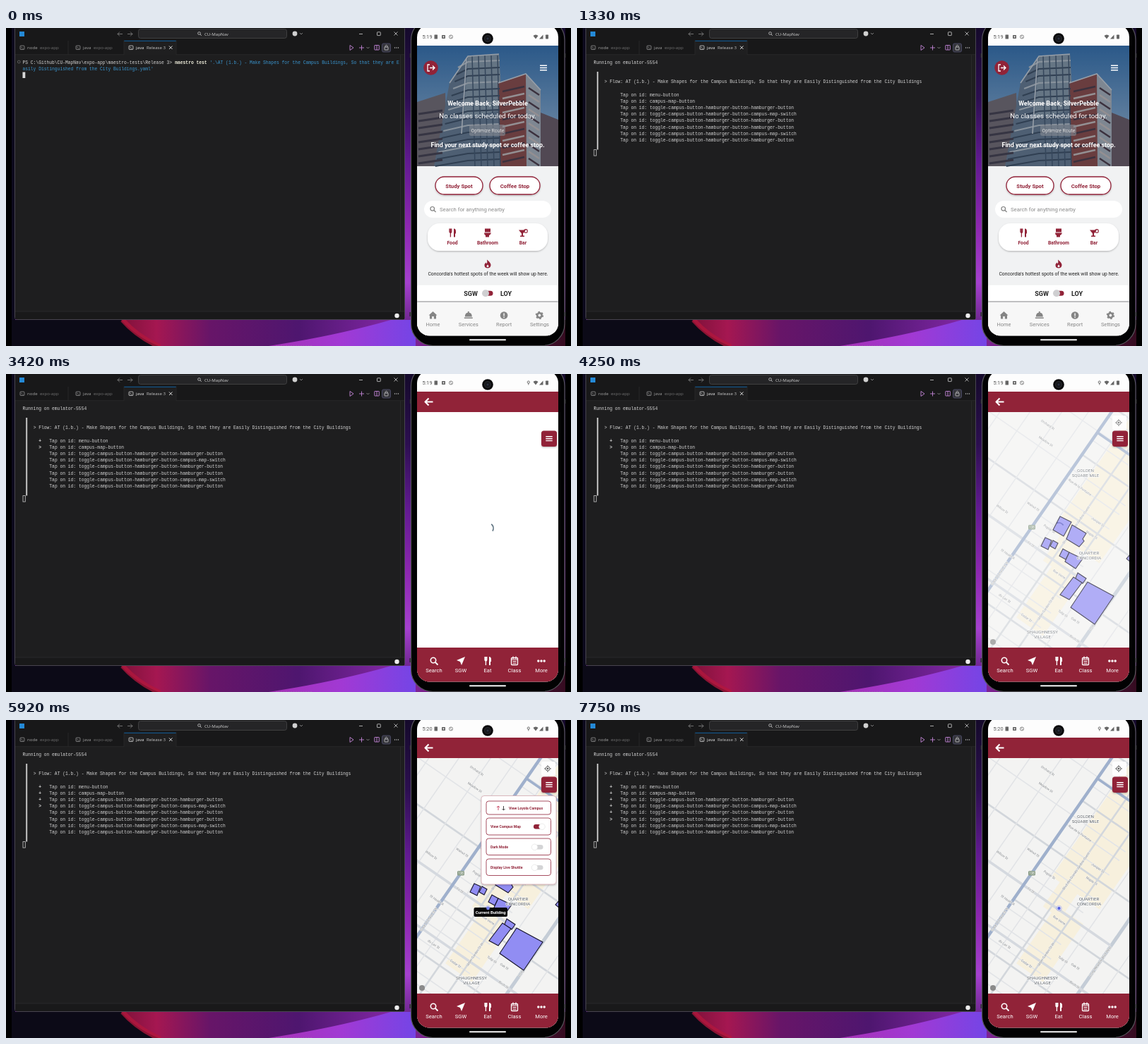
Animation, 800 px wide and 451 px high, one loop 8000 ms. Source, as an HTML page:

```html
<!DOCTYPE html>
<html lang="en">
<head>
<meta charset="utf-8">
<title>Campus map test run</title>
<style>
html, body { margin: 0; width: 100%; height: 100%; overflow: hidden; background: #000; }
svg { display: block; width: 800px; height: 451px; }
text { font-family: Roboto, "Noto Sans", sans-serif; white-space: pre; }
.mono { font-family: "Liberation Mono", "DejaVu Sans Mono", monospace; font-size: 6.3px; }
.ui { font-family: "Open Sans", "Noto Sans", sans-serif; font-size: 6.1px; }
.b { font-weight: 700; }
.m { text-anchor: middle; }
</style>
</head>
<body>
<svg id="stage" viewBox="0 0 800 451" xmlns="http://www.w3.org/2000/svg"></svg>
<script>
const LOOP = 8000;
const RED = '#912338';

const rect = (x, y, w, h, fill, rx = 0, more = '') =>
  `<rect x="${x}" y="${y}" width="${w}" height="${h}" rx="${rx}" fill="${fill}" ${more}/>`;
const dot = (x, y, r, fill, more = '') => `<circle cx="${x}" cy="${y}" r="${r}" fill="${fill}" ${more}/>`;
const shape = (d, fill, more = '') => `<path d="${d}" fill="${fill}" ${more}/>`;
const line = (d, color, w = 1, more = '') =>
  `<path d="${d}" fill="none" stroke="${color}" stroke-width="${w}" ${more}/>`;
const text = (x, y, s, size, fill, cls = '', more = '') =>
  `<text x="${x}" y="${y}" font-size="${size}" fill="${fill}" class="${cls}" ${more}>${s}</text>`;
const group = (id, body, more = '') => `<g id="${id}" ${more}>${body}</g>`;
const at = (x, y, body, s = 1) => `<g transform="translate(${x} ${y}) scale(${s})">${body}</g>`;

// Small icons, centred on 0,0
const burger = (c, w = 5, gap = 3.2) =>
  [-gap, 0, gap].map(y => line(`M${-w} ${y}H${w}`, c, 1.4)).join('');
const backArrow = c => line('M6 0H-5M0-5L-5 0L0 5', c, 2.1, 'stroke-linejoin="round"');
const fork = c => line('M-4-6V-2Q-4 0-2.6 0Q-1.2 0-1.2-2V-6M-2.6-6V6', c, 1.3) +
  shape('M2-6Q5-6 5-2V1H4V6H2Z', c);
const lens = c => `<circle cx="-1" cy="-1" r="3.7" fill="none" stroke="${c}" stroke-width="1.6"/>` +
  line('M2 2L5.5 5.5', c, 1.8);
const plane = c => shape('M6-6L1 6L-1 1L-6-1Z', c);
const calendar = c => `<rect x="-4.5" y="-4.5" width="9" height="10" rx="1" fill="none" stroke="${c}" stroke-width="1.3"/>` +
  line('M-4.5-2H4.5M-2-6.5V-3M2-6.5V-3M-2.5 .5H2.5M-2.5 3H2.5', c, 1.2);
const dots = (c, r, gap) => [-gap, 0, gap].map(x => dot(x, 0, r, c)).join('');
const house = c => shape('M-6 0L0-5.5L6 0H4.5V5H1.3V1.5H-1.3V5H-4.5V0Z', c);
const bell = c => shape('M-5 2Q-5-4 0-4Q5-4 5 2ZM-6 3H6V4.5H-6ZM-1-5.5H1V-4H-1Z', c);
const info = c => dot(0, 0, 5.3, c) + line('M0-3V1M0 2V3.4', '#f6f6f6', 1.5);
const gear = c => `<circle r="3.2" fill="none" stroke="${c}" stroke-width="2.6"/>` +
  `<circle r="4.9" fill="none" stroke="${c}" stroke-width="1.6" stroke-dasharray="2.5 2.63"/>`;
const toilet = c => shape('M-4-6H4V-1H-4ZM-5 0H5Q4 3 2 3.5V6H-3V3.5Q-5 3-5 0Z', c);
const glass = c => shape('M-6-4H4L0 1V4H2V5.5H-4V4H-2V1Z', c) +
  `<circle cx="4" cy="-2.6" r="2.3" fill="none" stroke="${c}" stroke-width="1.1"/>`;
const flame = c => shape('M-1-6Q5-1 4.5 2Q4 6 0 6Q-4.5 6-4.5 2Q-4.5 0-2.5-2L-1.5 0Q0-2-1-6Z', c) +
  shape('M0 1Q2 3 1.5 4Q0 5.5-1.5 4Q-2 3 0 1Z', '#f2f2f3');
const chevron = c => line('M-2-1L0 1L2-1', c, .8);
const shell = c => rect(-3, -2.7, 6, 5.4, 'none', 1, `stroke="${c}" stroke-width=".7"`) +
  line('M-1.7-1L-.5 0L-1.7 1M.2 1.1H1.8', c, .6);

function wallpaper() {
  return rect(8, 0, 784, 451, 'url(#side)') + rect(8, 0, 5, 451, '#0d0a1d') +
    rect(8, 414, 784, 37, '#0c0a17') +
    shape('M163 414Q184 438 216 451H792V414Z', 'url(#glow)') +
    line('M165 414Q186 438 218 452', '#b5173c', 7, 'opacity=".75"') +
    shape('M372 451Q470 436 545 414H580V451Z', 'url(#streak)') +
    line('M382 450.5H434', '#999', .8, 'stroke-dasharray="2 1.5" opacity=".4"');
}

function editor() {
  const grey = '#9a9a9a', pale = '#d0d0d0', tint = '#c586d8';
  let s = rect(12.5, -1, 552, 414.5, '#1e1e1f', 3, 'stroke="#48454f"');
  s += rect(13, 0, 551, 38, '#181819');
  s += rect(19, 5, 7, 7, '#2489d6');
  s += line('M165 8.500H158M161 5.500L158 8.500L161 11.500M172 8.500H179M176 5.500L179 8.500L176 11.500', '#888', .8);
  s += rect(187.5, 1.500, 210, 13, '#252527', 3, 'stroke="#48484a" stroke-width=".8"');
  s += at(274, 8, lens(pale), .5) + text(281, 10.500, 'CU-MapNav', 6.2, pale, 'ui');
  s += dot(409, 8, 3.4, pale) + at(418, 8, chevron(grey));
  s += line('M500 8.500H505M549.500 5.500L554.500 10.500M554.500 5.500L549.500 10.500', pale, .8) +
    rect(525.5, 5.8, 4.800, 4.800, 'none', .6, `stroke="${pale}" stroke-width=".8"`);
  s += rect(167, 18, 74, 20, '#1f1f20') + line('M167 18.300H241', '#0d72c0', .8) +
    line('M13 37.700H167M241 37.700H564M88 18V38M167 18V38M241 18V38', '#2b2b2d', .8);
  [[23, 'node', 48, 'expo-app'], [102, 'java', 124, 'expo-app'], [177, 'java', 199, 'Release 3']].forEach(([x, a, x2, b], i) => {
    const c = i === 2 ? '#f0f0f0' : '#a5a5a5';
    s += at(x, 27.800, shell(c)) + text(x + 7, 30, a, 6.1, c, 'ui') + text(x2, 30, b, 6.1, i === 2 ? '#c6c6c6' : '#727272', 'ui');
  });
  s += line('M231 25.500L235.500 30M235.500 25.500L231 30', '#eee', .9);
  s += line('M487 24.500L492 28L487 31.500Z', tint, .9) + line('M500 28H507M503.500 24.500V31.500', tint, .9) + at(512.500, 28, chevron(grey));
  s += rect(521.800, 24.500, 6.500, 6.500, 'none', .4, `stroke="${tint}" stroke-width=".9"`) + line('M525 24.500V31', tint, .9);
  s += rect(532.500, 22, 12, 12, '#34343a', 2, 'stroke="#56567a" stroke-width=".7"') +
    rect(536, 27, 5, 4, 'none', .5, `stroke="${pale}" stroke-width=".8"`) + line('M537 27V25.500Q538.500 23 540 25.500V27', pale, .8);
  s += at(553, 28, dots(pale, .7, 2.500));
  s += line('M558.500 38V402', '#2c2c2e', .8) + rect(13, 402, 551, 11, '#19191a') + line('M13 402H564', '#303032', .7);
  return s + dot(553.500, 408, 3.200, '#ededed');
}

const col = n => 23.5 + n * 3.785;
const row = n => 50.6 + n * 9.2;
const mono = (c, r, s, fill = '#d4d4d4', cls = '') => text(col(c), row(r), s, 6.3, fill, 'mono ' + cls);
const TITLE = 'Make Shapes for the Campus Buildings, So that they are Easily Distinguished from the City Buildings';
const BURGER_STEP = 'toggle-campus-button-hamburger-button-hamburger-button';
const SWITCH_STEP = 'toggle-campus-button-hamburger-button-campus-map-switch';
const STEPS = ['menu-button', 'campus-map-button', BURGER_STEP, SWITCH_STEP, BURGER_STEP, BURGER_STEP, SWITCH_STEP, BURGER_STEP];
const STEP_TIMES = [1500, 2830, 4670, 5750, 7170, 7750];

function terminal() {
  const cmd = `'.\\AT (1.b.) - ${TITLE}.yaml'`;
  const prompt = dot(18.300, 48, 1.900, 'none', 'stroke="#777" stroke-width=".7"') +
    mono(0, 0, 'PS C:\\Github\\CU-MapNav\\expo-app\\maestro-tests\\Release 3&gt;') +
    mono(57, 0, 'maestro test', '#f3f1df', 'b') +
    mono(70, 0, cmd.slice(0, 71), '#3a96d0') + mono(0, 1, cmd.slice(71), '#3a96d0') +
    rect(23.500, 62.500, 3.800, 8.500, '#d8d8d8');
  let run = mono(0, 0, 'Running on emulator-5554') + rect(28.200, 62, 2, 110.500, '#c4c4c4') +
    mono(4, 3, `&gt; Flow: AT (1.b.) - ${TITLE}`) +
    rect(24, 172.600, 3.300, 8.500, 'none', 0, 'stroke="#c8c8c8" stroke-width=".8"');
  STEPS.forEach((s, i) => {
    run += `<text id="mark${i}" class="mono b" x="${col(6)}" y="${row(5 + i)}" fill="#d4d4d4"></text>` + mono(10, 5 + i, 'Tap on id: ' + s);
  });
  return group('prompt', prompt) + group('run', run);
}

function photo() {
  let s = rect(582, 25, 200, 171, 'url(#sky)');
  s += shape('M582 105L622 92L626 196H582Z', '#746a6e');
  s += shape('M606 196L628 78L654 40L698 37L705 196Z', '#66788b');
  s += shape('M654 40L698 37L703 116L648 128Z', '#8595a2');
  s += shape('M696 78L736 65L757 88V196H700Z', '#8b4a45');
  s += shape('M736 65L757 88V196H737Z', '#a7aeb5') + shape('M757 120L782 130V196H757Z', '#6a5960');
  for (let i = 0; i < 15; i++) {
    const y = 52 + i * 10;
    s += line(`M${640 - i * 2.300} ${y + 4}L654 ${y - 4}L699 ${y - 6}`, i % 3 ? '#3e4d5e' : '#b5bcc2', 2.200);
    if (i > 3) s += line(`M703 ${y - 2}L734 ${y - 9}M740 ${y - 7}L755 ${y + 3}`, i % 2 ? '#c4b9b4' : '#4d3a43', 2.400);
    if (i > 6) s += line(`M584 ${y}L618 ${y - 5}`, '#463f4a', 3);
  }
  for (let x = 660; x < 700; x += 9) s += line(`M${x} 39L${x + 4} 196`, '#45566a', 1.500);
  s += line('M628 78L654 40L698 37M652 42L645 150M697 78L736 65L757 88', '#c7cdd2', 1.600);
  return s + rect(582, 25, 200, 171, '#0b1a30', 0, 'opacity=".26"');
}

function homeScreen() {
  const soft = 'filter="url(#soft)"';
  const pill = (x, w, s) => rect(x, 211, w, 25, '#fff', 12.500, `stroke="${RED}" stroke-width="1.3" ${soft}`) +
    text(x + w / 2, 226.500, s, 7.800, RED, 'b m');
  let s = rect(582, 25, 200, 411, '#f1f2f3') + photo();
  s += dot(601.500, 56.500, 10.300, RED) + line('M600 52H597V61H600M600 56.500H606.500M604 53.500L607 56.500L604 59.500', '#fff', 1.300);
  s += at(761, 56.500, burger('#fff'));
  s += text(682, 109.800, 'Welcome Back, SilverPebble', 8.900, '#fff', 'b m');
  s += text(682, 128, 'No classes scheduled for today.', 9.700, '#fff', 'm');
  s += rect(656, 137, 51, 16, '#888c94', 3, 'opacity=".6"') + text(682, 147.500, 'Optimize Route', 6.900, '#e2e2e2', 'm');
  s += text(682, 169, 'Find your next study spot or coffee stop.', 8.900, '#fff', 'b m');
  s += pill(608, 67, 'Study Spot') + pill(685, 71, 'Coffee Stop');
  s += rect(592, 245, 180, 24, '#fff', 12) + at(604.500, 257, lens('#808080'), .75) +
    text(614, 259.800, 'Search for anything nearby', 7.750, '#8a8a8a');
  s += rect(597, 277, 170, 39, '#fff', 17, soft);
  [['Food', fork], ['Bathroom', toilet], ['Bar', glass]].forEach(([label, icon], i) => {
    const x = 632 + i * 50;
    s += at(x, 290.500, icon(RED)) + text(x, 306.500, label, 6.800, RED, 'b m');
  });
  s += at(682, 334.500, flame(RED)) + text(682.500, 350.500, "Concordia's hottest spots of the week will show up here.", 6.850, '#222', 'm');
  s += rect(582, 364.500, 200, 22.500, '#fff', 2, soft) + text(658, 379.500, 'SGW', 9, '#222', 'b m') + text(708, 379.500, 'LOY', 9, '#222', 'b m');
  s += rect(675, 372.800, 14.500, 7, RED, 3.500) + dot(679, 376.300, 5, '#cfcfd1');
  s += rect(582, 388.500, 200, 48, '#f7f7f7') + line('M582 388.500H782', '#b9b9bb', 1);
  [['Home', house], ['Services', bell], ['Report', info], ['Settings', gear]].forEach(([label, icon], i) => {
    const x = 604.500 + i * 50.300;
    s += at(x, 407.500, icon('#858585')) + text(x, 422.500, label, 7.400, '#858585', 'm');
  });
  return s;
}

function menuScreen() {
  const pin = dot(0, -2, 2.300, '#e0344b') + line('M0 0V4.500', '#777', .9);
  const bubble = shape('M-5-3.500H5V2.500H0L-3 5V2.500H-5Z', '#d6d9de', 'stroke="#888" stroke-width=".6"') + dots('#555', .7, 2.200);
  const bus = rect(-5, -3.500, 10, 6.500, '#7c9298', 1) + rect(-4, -2.500, 8, 2.500, '#d5e7ef') + dot(-2.500, 3.300, 1.300, '#444') + dot(2.500, 3.300, 1.300, '#444');
  const book = shape('M0-2Q-3-4-5-3V3Q-3 2 0 4Q3 2 5 3V-3Q3-4 0-2Z', '#ddd', 'stroke="#777" stroke-width=".7"') + line('M0-2V4', '#777', .7);
  const block = rect(-4, -4.500, 8, 9, '#b8b2b4', .5) + line('M-2-4V4M0-4V4M2-4V4', '#777f90', .9, 'stroke-dasharray="1.2 1"');
  let s = rect(582, 25, 200, 411, RED) + at(600.500, 65, backArrow('#fff')) + text(682, 69.500, 'Menu', 14.300, '#fff', 'b m');
  [['Campus Map', 653, 661, pin], ['Chatbot', 664, 672.500, bubble], ['Shuttle Schedule', 644.500, 653, bus],
    ['Study Spots', 655.500, 663.500, book], ['Indoor Map', 656.500, 664.500, block]].forEach(([label, ix, tx, icon], i) => {
    const y = 98.500 + i * 41.200;
    s += rect(597, y, 170, 29.500, '#fff', 5, 'filter="url(#soft)"') + at(ix, y + 15, icon) + text(tx, y + 18.300, label, 9.300, RED, 'b');
  });
  return s;
}

function streets() {
  // Axes follow the street grid: x runs north-east, y south-east
  let s = rect(12, 26, 200, 82, '#f7f0dd') + rect(-118, 55, 100, 46, '#f7f0dd') + rect(-30, 40, 50, 30, '#f7f0dd');
  for (let i = 0; i < 22; i++) {
    const x = -215 + i * 21 + (i * 7 % 5) * 2;
    s += line(`M${x} ${i % 3 ? 0 : -210}V${i % 4 ? 92 : 260}`, i % 4 ? '#e2e4e7' : '#d2d6db', i % 4 ? 1.600 : 2.600);
  }
  [-170, -130, -95, -58, -27, 24, 112, 180, 210].forEach(y => { s += line(`M-260 ${y}H260`, '#e1e3e6', 1.500); });
  [50, 82].forEach(y => { s += line(`M-260 ${y}H260`, '#d3d7dc', 2.600); });
  s += line('M-260 151H260', '#c4ccd6', 5);
  s += line('M-96 -180V260M-21 -120V150', '#d5d9df', 3.600);
  s += line('M-260 0H260', '#9fb0cc', 4.400) + line('M163 0V110', '#9fb0cc', 3.600);
  const label = (x, y, name, turn) => text(0, 1.500, name, 4.700, '#85898e', 'm', `transform="translate(${x} ${y}) rotate(${turn})" stroke="#f5f5f4" stroke-width="1" paint-order="stroke"`);
  [[132, -64, 'Orchard St'], [111, -53, 'Meadow St'], [25, -15, 'Walnut St'], [12, 22, 'Poplar St'], [-21, 13, 'Fir St'],
    [-51, -6, 'St Hazel St'], [-33, 70, 'Rue Verte'], [-105, 26, 'du Lac St'], [-110, 67, 'Cedar St'], [59, 73, 'Juniper St'],
    [39, 76, 'Maple St'], [85, 24, 'Rue de la Fontaine'], [-3, -49, 'Willow St'], [-76, 106, 'Tulip St'], [-74, 126, 'Oak St'], [-96, 140, 'Birch St']
  ].forEach(([x, y, name]) => { s += label(x, y, name, 90); });
  [[38, 50, 'Blvd des Grands Jardins Ouest'], [-84, 82, 'Upper Garden St W'], [-48, 151, 'Long Meadow Blvd West'], [-80, 0, 'Great Orchard St W']]
    .forEach(([x, y, name]) => { s += label(x, y, name, 0); });
  return s;
}

const BUILDINGS = [
  '684 202 700 210 689 230 674 221', '701 214 721 226 716 234 718 237 711 245 693 234',
  '663 232 672 236 667 249 657 244', '674 236 681 240 677 248 670 244',
  '688 248 697 253 692 263 683 258', '697 253 716 262 706 276 691 266',
  '709 282 721 290 716 297 705 292', '703 288 715 296 697 320 684 313',
  '723 295 760 315 733 355 699 331', '784 255 778 262 784 267'
];

function popup() {
  let s = rect(673, 107.500, 106, 125.500, '#fff', 4, 'stroke="#d5a9b2" stroke-width=".8" filter="url(#soft)"');
  const rows = [[115, 19], [139, 24], [168, 23.500], [197, 23.500]];
  rows.forEach(([y, h]) => { s += rect(680, y, 91.500, h, '#fff', 3.500, `stroke="${RED}" stroke-width=".8"`); });
  s += line('M697 128V122M695 124L697 122L699 124', '#c43a5a', .9) + line('M704.500 122V128M702.500 126L704.500 128L706.500 126', '#333', .9);
  s += text(712, 127, 'View Loyola Campus', 5.150, RED, 'b');
  ['View Campus Map', 'Dark Mode', 'Display Live Shuttle'].forEach((label, i) => {
    const y = 151.300 + i * 29;
    s += text(686, y + 1.900, label, 5.150, RED, 'b');
    s += rect(747, y - 3.200, 13.500, 6.400, '#d4d4d6', 3.200);
    if (!i) s += rect(747, y - 3.200, 13.500, 6.400, RED, 3.200, 'id="track"');
    s += dot(i ? 748.500 : 0, y, 4.300, '#fff', (i ? '' : 'id="thumb"') + ' stroke="#ddd" stroke-width=".6"');
  });
  return s;
}

function mapScreen() {
  const place = (x, y, a, b) => [a, b].map((s, i) => text(x, y + i * 7.500, s, 6.200, '#555b61', 'm',
    'stroke="#fff" stroke-width="1.2" paint-order="stroke"')).join('');
  let map = rect(582, 54, 200, 334, '#f3f3f2') + `<g transform="translate(644 217) rotate(-55.3)">${streets()}</g>`;
  map += rect(639, 214, 10, 6.500, '#8b9d88', 1.500) + text(644, 219, '138', 4.500, '#fff', 'm');
  map += group('shapes', BUILDINGS.map(p => `<polygon points="${p}" fill="#918df3" stroke="#15132b" stroke-width="1.1"/>`).join(''));
  map += place(720, 138.500, 'GOLDEN', 'SQUARE MILE') + place(725, 255.500, 'QUARTIER', 'CONCORDIA') + place(659, 367.500, 'SHAUGHNESSY', 'VILLAGE');
  map += dot(589, 380, 4, '#8a8a8a');
  map += group('here', dot(682.500, 267, 4.300, '#7f86f0', 'opacity=".35"') + dot(682.500, 267, 2.600, '#5360df', 'stroke="#fff" stroke-width=".7"'));
  map += group('label', rect(662.500, 266, 47.500, 13, '#080808', 2) + text(686.200, 274.700, 'Current Building', 5.900, '#fff', 'b m') + dot(682.500, 267, 2.400, '#7880ea'));
  map += rect(758, 59, 20, 20, '#fff', 2, 'opacity=".85"') + dot(767, 69, 3, 'none', 'stroke="#666" stroke-width="1"') +
    dot(767, 69, 1.300, '#555') + line('M767 64V66M767 72V74M762 69H764M770 69H772', '#666', 1);
  let s = rect(582, 54, 200, 334, '#fff') +
    `<path id="spinner" d="M5.200-6.100A8 8 0 0 1 7.100 3.700" fill="none" stroke="#607482" stroke-width="1.8"/>`;
  s += group('map', map, 'clip-path="url(#mapClip)"') + group('popup', popup());
  s += rect(582, 25, 200, 29, RED) + rect(582, 388, 200, 49, RED) + at(598.500, 39.500, backArrow('#fff'));
  s += rect(758, 80.500, 22, 22.500, RED, 3.500, 'filter="url(#soft)"') + at(769, 91.700, burger('#fff', 4.700, 2.900));
  [['Search', lens], ['SGW', plane], ['Eat', fork], ['Class', calendar], ['More', c => dots(c, 1.700, 4.200)]].forEach(([label, icon], i) => {
    const x = 606 + i * 38;
    s += at(x, 407, icon('#fff')) + text(x, 422.500, label, 7.600, '#fff', 'm');
  });
  return s;
}

function phone() {
  const grey = '#666';
  let s = [36, 403].map(y => rect(571.500, y, 3, 6, '#29292d') + rect(789.500, y, 3, 6, '#29292d')).join('');
  s += rect(573.500, -14, 217.500, 464.500, '#020203', 31, 'stroke="#55545a" stroke-width="1.2"');
  let inner = rect(582, -4, 200, 441, '#fdfdfd') + group('home', homeScreen()) + group('menu', menuScreen()) + group('campus', mapScreen());
  inner += `<text id="clock" x="589.500" y="15.200" font-size="7.300" fill="#555"></text>`;
  inner += rect(606.500, 9.500, 4.500, 6, grey, .6) + rect(617, 10, 5, 5, grey, .8) + dot(619.500, 12.500, 1, '#fff') +
    dot(630, 12.500, 2.500, 'none', `stroke="${grey}" stroke-width=".8"`) + line('M628.500 11L631.500 14', grey, .7);
  inner += shape('M746.500 11Q750 8 753.500 11L750 15.500Z', grey) + shape('M755 15.500H760.500V9.500Z', grey) + rect(764, 9.500, 4, 6, grey, .7);
  inner += group('gps', dot(739.800, 11.600, 1.600, 'none', `stroke="${grey}" stroke-width="1"`) + line('M739.800 13V15.500', grey, .9));
  s += `<g clip-path="url(#screen)">${inner}</g>`;
  s += dot(682, 15, 7.800, '#08080a') + dot(682, 15, 4.500, '#17181c', 'stroke="#34353a" stroke-width=".7"') + dot(682, 15, 1.500, '#2a3040');
  return s + rect(656, 441.200, 52, 2, '#f5f5f5', 1);
}

const gradient = (id, dir, stops) => `<linearGradient id="${id}" ${dir}>` +
  stops.map(([o, c]) => `<stop offset="${o}" stop-color="${c}"/>`).join('') + '</linearGradient>';
const down = 'x1="0" y1="0" x2="0" y2="1"';
const defs = '<defs>' +
  gradient('side', down, [[0, '#150a2b'], [.22, '#2c0f50'], [.42, '#611a91'], [.62, '#8d27b0'], [.8, '#a540cf'], [1, '#4e176a']]) +
  gradient('glow', '', [[0, '#7e1239'], [.08, '#a51751'], [.2, '#671568'], [.4, '#4e166f'], [.62, '#8428a6'], [.8, '#67165c'], [1, '#350c20']]) +
  gradient('streak', '', [[0, '#a531b5'], [.5, '#a139d4'], [1, '#7445e6']]) +
  gradient('sky', down, [[0, '#376fa8'], [1, '#a7c0d5']]) +
  '<clipPath id="screen"><rect x="582" y="-5" width="200" height="441.500" rx="18"/></clipPath>' +
  '<clipPath id="mapClip"><rect x="582" y="54" width="200" height="334"/></clipPath>' +
  '<filter id="soft" x="-20%" y="-30%" width="140%" height="170%"><feDropShadow dx="0" dy="1.2" stdDeviation="1.1" flood-opacity=".25"/></filter></defs>';

document.getElementById('stage').innerHTML = defs + wallpaper() + editor() + terminal() + phone();

const nodes = {};
document.querySelectorAll('svg [id]').forEach(n => { nodes[n.id] = n; });
const ramp = (t, a, b) => Math.min(1, Math.max(0, (t - a) / (b - a)));
const show = (id, on) => {
  nodes[id].setAttribute('opacity', +on);
  nodes[id].style.display = on ? '' : 'none';
};

function draw(t) {
  show('prompt', t < 1330);
  show('run', t >= 1330);
  STEPS.forEach((_, i) => {
    nodes['mark' + i].textContent = t >= STEP_TIMES[i + 1] ? '+' : t >= STEP_TIMES[i] ? '>' : '';
  });
  show('menu', ramp(t, 2130, 2320));
  show('campus', ramp(t, 3290, 3410));
  show('gps', t >= 3330);
  show('map', ramp(t, 4130, 4300));
  show('shapes', t >= 4250 && t < 6750);
  show('here', t >= 4830);
  show('label', t >= 5000 && t < 6750);
  show('popup', t >= 5250 && t < 7500);
  nodes.clock.textContent = t < 5920 ? '5:19' : '5:20';
  nodes.spinner.setAttribute('transform', `translate(682 219) rotate(${(t - 3420) * .36})`);
  const off = ramp(t, 6640, 6850);
  nodes.thumb.setAttribute('cx', 759 - 10.500 * off * (2 - off));
  nodes.track.setAttribute('opacity', 1 - off);
}

const start = performance.now();
function tick() {
  draw((performance.now() - start) % LOOP);
  requestAnimationFrame(tick);
}
tick();
</script>
</body>
</html>
```
